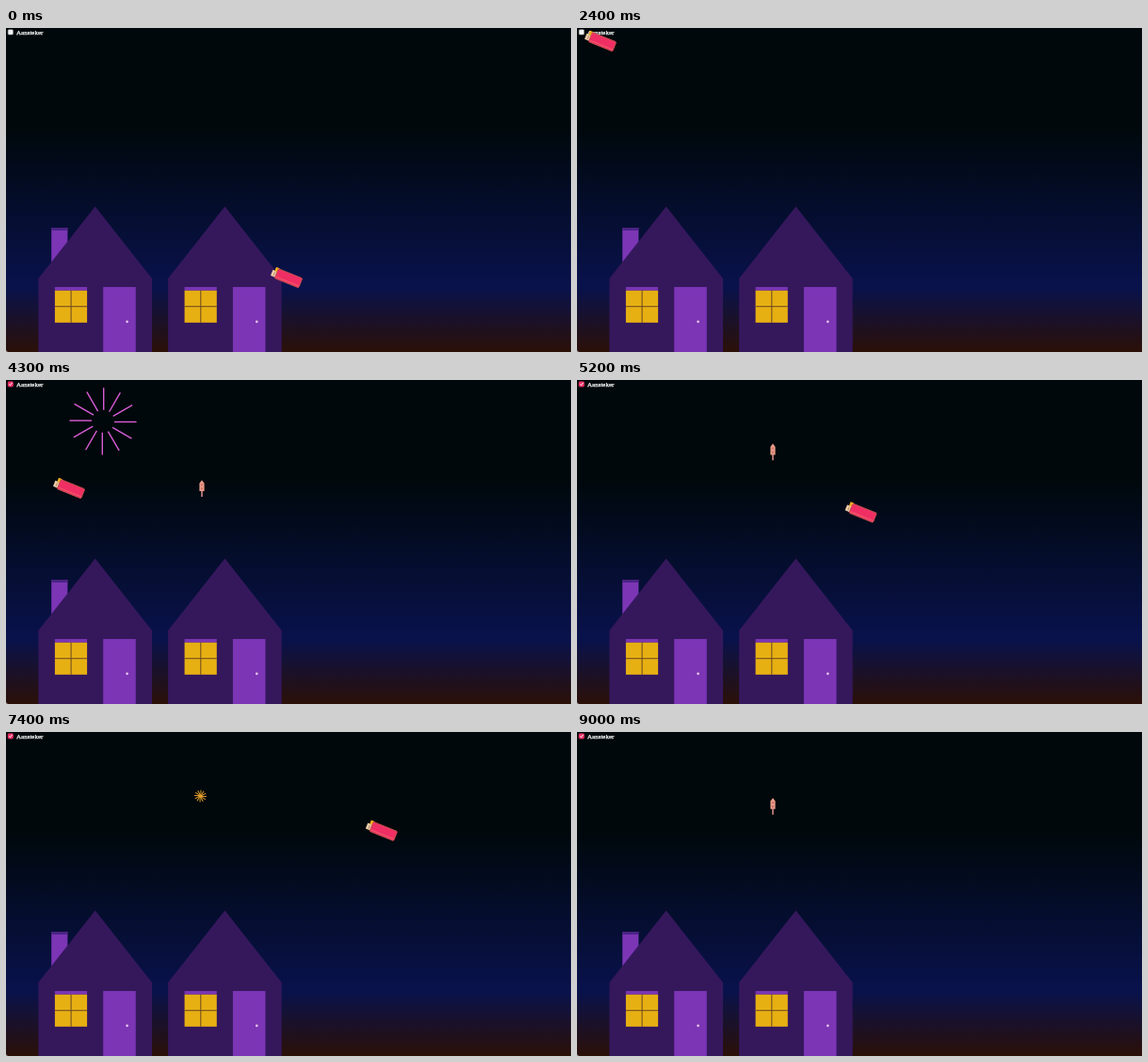
Animation, 600 px wide and 344 px high, one loop 9100 ms. Source, as an HTML page with a canvas:

```html
<!DOCTYPE html>
<html lang="nl">
<head>
<meta charset="utf-8">
<title>Aansteker</title>
<style>
  html, body { margin: 0; width: 100%; height: 100%; overflow: hidden; background: #00080b; }
  canvas { display: block; width: 600px; height: 344px; }
</style>
</head>
<body>
<canvas id="stage" width="600" height="344"></canvas>
<script>
const ctx = document.getElementById('stage').getContext('2d');
const LOOP = 9100, STEP = 100;
const LIT = 3300;      // the box is ticked
const LAUNCH = 3320;   // first rocket leaves
const CYCLE = 2000;

// where the hand brings the lighter, and when
const stops = [
  { at: 0, x: 281, y: 253 },
  { at: 1100, x: 42, y: 40 },
  { at: 1500, x: 25, y: 23 },
  { at: 2400, x: 8, y: 2 },
  { at: 3600, x: 1, y: 1 },
  { at: 4300, x: 50, y: 103 },
  { at: 5600, x: 353, y: 136 },
  { at: 6700, x: 353, y: 136 },
  { at: 7300, x: 381, y: 92 },
  { at: 8300, x: 412, y: 120 }
];

const sky = ctx.createLinearGradient(0, 0, 0, 344);
sky.addColorStop(0.3, '#00080b');
sky.addColorStop(0.8, '#09124c');
sky.addColorStop(1, '#2b1007');

const mix = (a, b, k) => a + (b - a) * k;
const smooth = k => k * k * (3 - 2 * k);

// cubic-bezier(.25, .1, .25, 1)
function ease(x) {
  let lo = 0, hi = 1, u = 0.5;
  for (let i = 0; i < 24; i++) {
    u = (lo + hi) / 2;
    if (0.75 * u * (1 - u) + u ** 3 < x) lo = u; else hi = u;
  }
  return 0.3 * u * (1 - u) ** 2 + 3 * u * u * (1 - u) + u ** 3;
}

// runs a drawing with its origin moved to (x, y)
function place(x, y, paint) {
  ctx.save();
  ctx.translate(x, y);
  paint();
  ctx.restore();
}

function rect(color, x, y, w, h) {
  ctx.fillStyle = color;
  ctx.fillRect(x, y, w, h);
}

function poly(color, ...points) {
  ctx.fillStyle = color;
  ctx.beginPath();
  points.forEach(([x, y]) => ctx.lineTo(x, y));
  ctx.fill();
}

function box(fill, stroke, width, x, y, w, h) {
  ctx.fillStyle = fill;
  ctx.strokeStyle = stroke;
  ctx.lineWidth = width;
  ctx.beginPath();
  ctx.roundRect(x, y, w, h, 1);
  ctx.fill();
  ctx.stroke();
}

function chimney() {
  rect('#7b35b5', 0, 0, 17.2, 50);
  rect('#4b2383', 0, 0, 17.2, 3);
}

function house() {
  poly('#35185c', [60.3, 0], [120.6, 76.5], [120.6, 155], [0, 155], [0, 76.5]);
  place(17.5, 85.5, () => {
    rect('#e7b012', 0, 3.5, 34.2, 34.3);
    rect('#7b35b5', 0, 0, 34.2, 3.5);
    rect('#6b4824', 16.7, 3.5, 1, 34.3);
    rect('#6b4824', 0, 20.2, 34.2, 1);
  });
  rect('#7b35b5', 68.8, 85.5, 34.6, 69);
  ctx.fillStyle = '#e3c4e8';
  ctx.beginPath();
  ctx.arc(94.2, 122.3, 1.4, 0, 7);
  ctx.fill();
}

function rocket(t) {
  if (t < LAUNCH) return;
  const rise = ease((t - LAUNCH) % CYCLE / CYCLE);
  place(208, mix(255.5, 67.2, rise), () => {
    rect('#cf8b86', -0.8, 11, 1.6, 6.7);
    poly('#e89c88', [0, 0], [2.6, 3.5], [2.6, 11.8], [-2.6, 11.8], [-2.6, 3.5]);
    for (const y of [4, 8]) rect('#c2555a', -0.6, y, 1.2, 2);
  });
}

function burst(t, start, x, y, size, color) {
  const age = (t - start) % CYCLE;
  if (t < start || age > 300) return;
  const outer = 0.127 * age * size;
  const inner = Math.max(0, 0.06 * (age - 80)) * size;
  place(x, y, () => {
    for (let i = 0; i < 12; i++) {
      rect(color, inner, 0, outer - inner, 1.4 * size);
      ctx.rotate(Math.PI / 6);
    }
  });
}

function checkbox(on) {
  const pink = '#ee2f68';
  box(on ? pink : '#f4f4f4', on ? pink : '#8a8a8a', 0.6, 2.1, 1.7, 5.4, 5.4);
  ctx.strokeStyle = '#fff';
  if (on) {
    ctx.lineWidth = 1;
    ctx.beginPath();
    ctx.moveTo(3.2, 4.5);
    ctx.lineTo(4.4, 5.7);
    ctx.lineTo(6.5, 3);
    ctx.stroke();
  }
  ctx.fillStyle = '#fff';
  ctx.lineWidth = 0.25;
  ctx.font = '7px "Liberation Serif", Times, serif';
  ctx.fillText('Aansteker', 11, 6.6);
  ctx.strokeText('Aansteker', 11, 6.6);
}

function lighter(t) {
  const i = stops.findIndex(s => s.at > t);
  if (i < 0) return;
  const a = stops[i - 1], b = stops[i];
  const k = smooth((t - a.at) / (b.at - a.at));
  place(mix(a.x, b.x, k) + 8.2, mix(a.y, b.y, k) + 2.3, () => {
    ctx.rotate(0.384);
    rect('#ecceaa', -4.8, 3.6, 5, 6.4);
    rect('#b98f6a', -2.4, 5, 1, 4);
    rect('#efb01e', -2.6, -0.6, 4, 4.6);
    box('#ef2f63', '#c9574f', 0.8, 0.2, 0.2, 27.4, 10.8);
    rect('#f0636f', 1, 8.6, 26, 1);
  });
}

function draw(now) {
  const t = Math.floor(now % LOOP / STEP) * STEP;
  rect(sky, 0, 0, 600, 344);
  rocket(t);
  burst(t, LAUNCH + 700, 103, 43.8, 1, '#d95cd6');
  burst(t, LAUNCH + CYCLE, 206.5, 68, 0.63, '#f0a62c');
  place(48.2, 212, chimney);
  place(34.4, 189.5, house);
  place(172.1, 189.5, house);
  poly('#8c8c8c', [0, 342], [2, 344], [0, 344]);
  checkbox(t >= LIT);
  lighter(t);
}

let begin;
function tick(now) {
  begin ??= now;
  draw(now - begin);
  requestAnimationFrame(tick);
}
draw(0);
requestAnimationFrame(tick);
</script>
</body>
</html>
```
